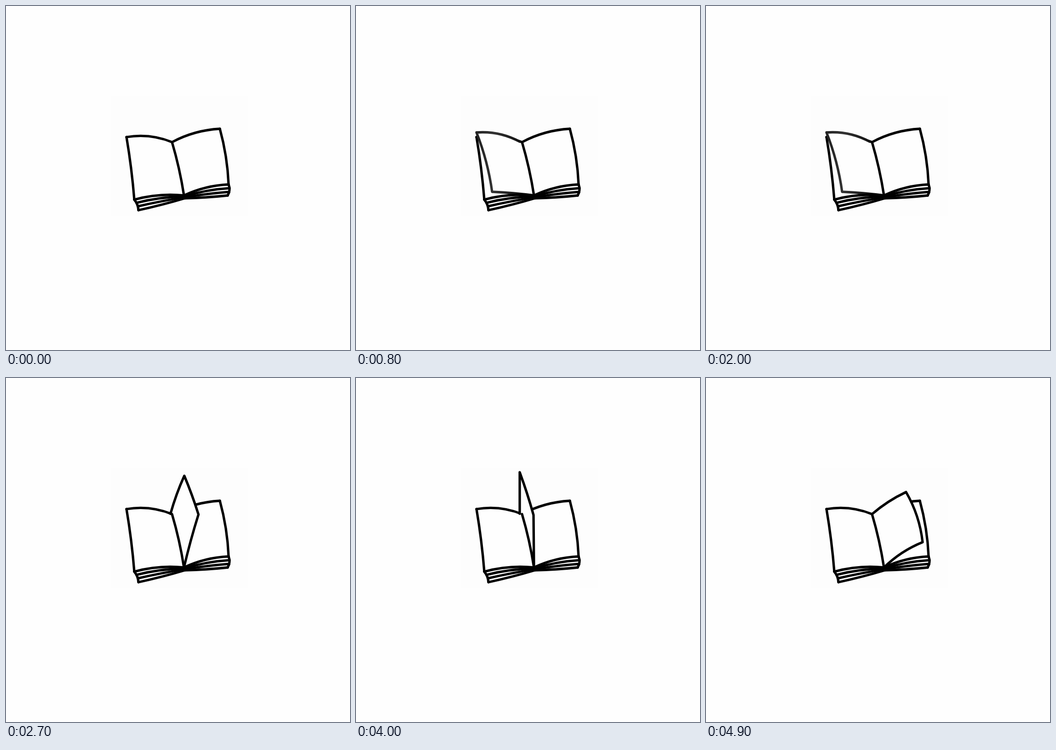
These frames come from a looping animation (748 by 748 pixels, 5010 ms). An HTML page with a canvas:

```html
<!DOCTYPE html>
<html lang="en">
<head>
<meta charset="utf-8">
<title>Turning page</title>
<style>
html, body { margin: 0; width: 100%; height: 100%; overflow: hidden; background: #fefefe; }
canvas { display: block; }
</style>
</head>
<body>
<canvas id="stage" width="748" height="748"></canvas>
<script>
const ctx = document.getElementById('stage').getContext('2d');
const LOOP = 5010, STEP = 100, CYCLE = 12, LAST_TURN = 8;
const PAPER = '#fefefe', INK = '#000';

// Corners of the open book.
const hinge = [361, 296], foot = [387, 412];
const leftTop = [262, 285], leftLow = [279, 421], leftBase = [288, 444];
const rightTop = [465, 267], rightLow = [484, 388], rightBase = [482, 412];

// Key poses of the turning page:
// top corner x, y, bottom corner x, y, bows of the top, outer and bottom edges.
const poses = [
  { step: 1, pose: [435, 248, 471, 357, 3, 6, -5] },
  { step: 4, pose: [356, 205, 386, 298, 0, 1, 0] },
  { step: 6, pose: [295, 217, 326, 340, -4, 3, 1] },
  { step: 8, pose: [262, 275, 296, 404, -7, 4, 1] }
];

const mix = (a, b, t) => a.map((v, i) => v + (b[i] - v) * t);

// Control point that makes the line a-b bulge by h at its middle.
function bowControl(a, b, h) {
  const dx = b[0] - a[0], dy = b[1] - a[1], k = 2 * h / Math.hypot(dx, dy);
  return [(a[0] + b[0]) / 2 + dy * k, (a[1] + b[1]) / 2 - dx * k];
}

function pointOnBow(a, b, h, t) {
  const c = bowControl(a, b, h);
  return mix(mix(a, c, t), mix(c, b, t), t);
}

function bowTo(a, b, h) {
  ctx.quadraticCurveTo(...bowControl(a, b, h), ...b);
}

function bow(a, b, h) {
  ctx.beginPath();
  ctx.moveTo(...a);
  bowTo(a, b, h);
  ctx.stroke();
}

// Smooth polynomial path through the key poses.
function poseAt(step) {
  const weights = poses.map(p => poses.reduce(
    (w, q) => q === p ? w : w * (step - q.step) / (p.step - q.step), 1));
  return poses[0].pose.map((_, i) =>
    poses.reduce((sum, p, k) => sum + weights[k] * p.pose[i], 0));
}

function drawTurningPage(step) {
  const [tx, ty, bx, by, topBow, outerBow, lowBow] = poseAt(step);
  const root = mix(hinge, [356, 295], Math.min(1, (step - 1) / 3));
  const top = [tx, ty], bottom = [bx, by];
  ctx.beginPath();
  ctx.moveTo(...root);
  bowTo(root, top, topBow);
  bowTo(top, bottom, outerBow);
  bowTo(bottom, foot, lowBow);
  ctx.fill();
  if (step === LAST_TURN) {
    const fade = ctx.createLinearGradient(tx, 0, foot[0], 0);
    fade.addColorStop(0, '#222');
    fade.addColorStop(0.3, '#333');
    fade.addColorStop(1, INK);
    ctx.strokeStyle = fade;
  }
  ctx.stroke();
  ctx.strokeStyle = INK;
}

// Page edges fanning out from the foot of the spine; side is -1 left, 1 right.
function drawStack(low, base, edgeBow, side) {
  bow(low, base, edgeBow);
  for (let i = 0; i < 4; i++) {
    const start = mix(foot, [389, 418], i / 3);
    bow(start, pointOnBow(low, base, edgeBow, i / 3), side * (5 - 2 * i));
  }
}

function draw(phase) {
  ctx.fillStyle = PAPER;
  ctx.fillRect(0, 0, 748, 748);
  ctx.fillStyle = '#fdfdfd';
  ctx.fillRect(229, 196, 298, 260);

  ctx.fillStyle = PAPER;
  ctx.strokeStyle = INK;
  ctx.lineWidth = 5.3;
  ctx.lineCap = ctx.lineJoin = 'round';

  ctx.beginPath();
  for (const p of [leftTop, hinge, rightTop, rightLow, foot, leftLow]) ctx.lineTo(...p);
  ctx.fill();

  bow(leftTop, hinge, 7);
  bow(hinge, rightTop, 6);
  bow(leftTop, leftLow, 1.5);
  bow(rightTop, rightLow, 3.5);
  if (phase >= 1 && phase <= LAST_TURN) drawTurningPage(phase);
  bow(hinge, foot, 2);
  drawStack(leftLow, leftBase, 2, -1);
  drawStack(rightLow, rightBase, 3, 1);
}

let shown = -1;
function tick() {
  const t = performance.now() % LOOP;
  const phase = Math.min(49, Math.floor(t / STEP)) % CYCLE;
  if (phase !== shown) draw(shown = phase);
  requestAnimationFrame(tick);
}
tick();
</script>
</body>
</html>
```
